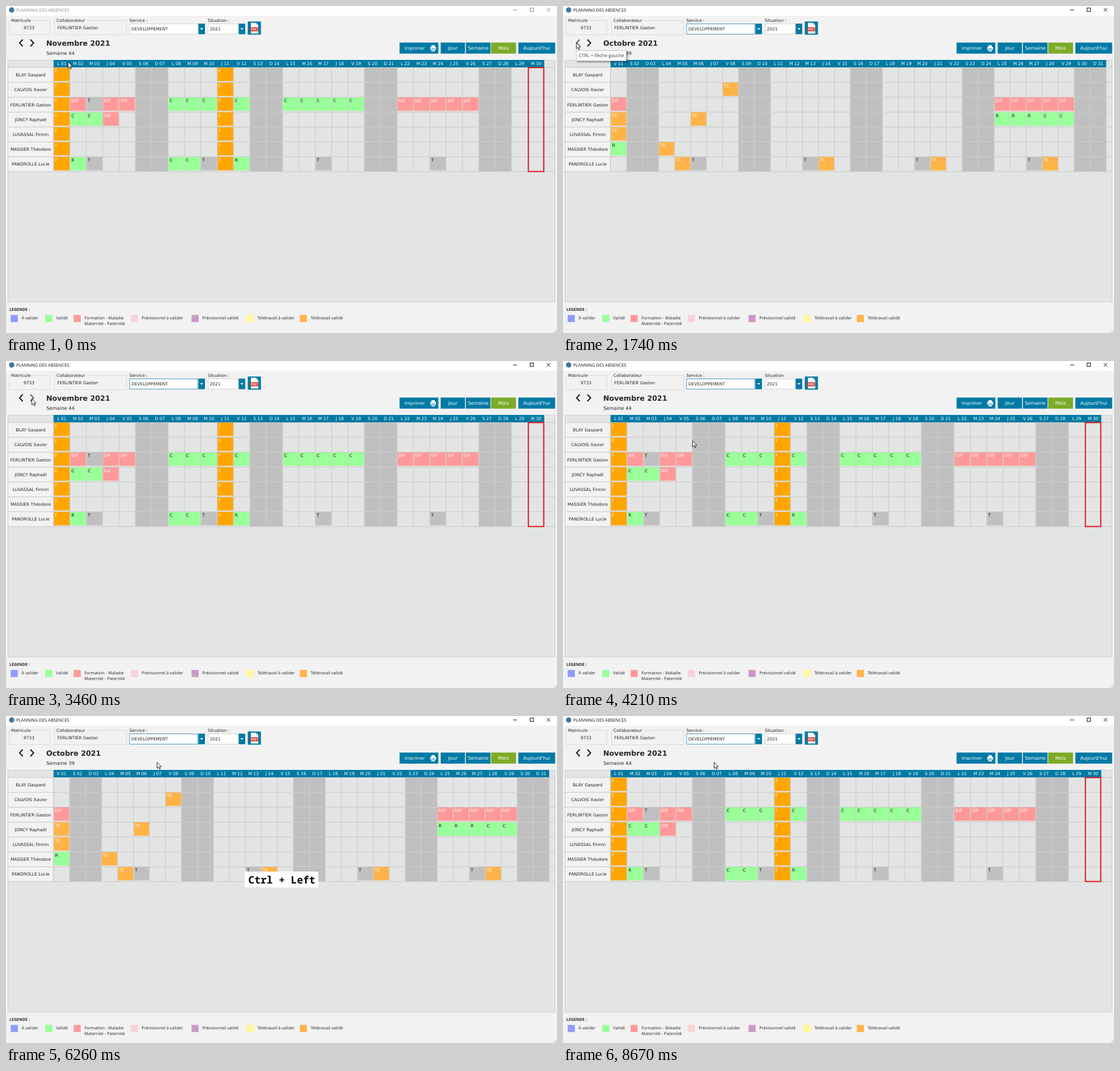
Animation, 972 px wide and 576 px high, one loop 9280 ms. Source, as an HTML page with a canvas:

```html
<!DOCTYPE html>
<html lang="fr">
<head>
<meta charset="utf-8">
<title>Planning des absences</title>
<style>
html, body { margin: 0; width: 100%; height: 100%; overflow: hidden; background: #f2f2f2; }
canvas { display: block; }
</style>
</head>
<body>
<canvas id="stage" width="972" height="576"></canvas>
<script>
const ctx = document.getElementById('stage').getContext('2d');
const LOOP = 9280;
const SANS = '"DejaVu Sans", sans-serif', UI = '"Open Sans", sans-serif', MONO = '"Noto Sans Mono", monospace';
const BLUE = '#007aa5', GREEN = '#7cab27', INK = '#262626', PANEL = '#e3e5e4', LINE = '#cccccc';
const LEFT = 84, TOP = 108, ROW = 26.22, BOTTOM = TOP + 7 * ROW;

const people = ['BLAY Gaspard', 'CALVOIS Xavier', 'FERLINTIER Gaston', 'JONCY Raphaël',
  'LUVASSAL Firmin', 'MASSIER Théodore', 'PANDROLLE Lucie'];

// Cell kinds: label, fill, text colour
const kinds = {
  F: ['F', '#ffa500', '#fff3d6'],
  D: ['DIF', '#ff9999', '#fff'],
  E: ['TE', '#ffb347', '#fff'],
  C: ['C', '#99ff99', '#111'],
  R: ['R', '#99ff99', '#111'],
  T: ['T', '#c0c0c0', '#111']
};

const november = {
  title: 'Novembre 2021', week: 'Semaine 44', days: 30, first: 1, width: 28.85, today: 30,
  rows: ['F1 F11', 'F1 F11',
    'F1 D2 T3 D4 D5 C8 C9 C10 F11 C12 C15 C16 C17 C18 C19 D22 D23 D24 D25 D26',
    'F1 C2 C3 D4 F11', 'F1 F11', 'F1 F11', 'F1 R2 T3 C8 C9 T10 F11 R12 T17 T24']
};
const october = {
  title: 'Octobre 2021', week: 'Semaine 39', days: 31, first: 5, width: 28.2,
  rows: ['', 'E8', 'D1 D25 D26 D27 D28 D29', 'E1 E6 R25 R26 R27 C28 C29', 'E1', 'R1 E4',
    'E5 T6 T13 E14 T20 E21 T27 E28']
};

const legend = [
  [8, '#8f9bfa', 'À valider'], [69, '#99ff99', 'Validé'],
  [119, '#ff9999', 'Formation - Maladie', 'Maternité - Paternité'],
  [220, '#f8d2d6', 'Prévisionnel à valider'], [327, '#cc99c6', 'Prévisionnel validé'],
  [424, '#fff799', 'Télétravail à valider'], [518, '#ffb347', 'Télétravail validé']
];

// Pointer moves: start, end, from, to, eased
const moves = [
  [30, 540, 109, 98, 23, 64, 1],
  [2210, 2490, 23, 64, 45, 66, 1],
  [3490, 4180, 45, 66, 226, 139, 1],
  [4209, 4210, 226, 139, 228, 140, 0],
  [4489, 4490, 228, 140, 229, 140, 0],
  [4740, 4940, 229, 140, 189, 107, 0],
  [4940, 5110, 189, 107, 227, 96, 0],
  [5110, 5200, 227, 96, 254, 85, 0],
  [5200, 5360, 254, 85, 266, 81, 0]
];

const within = (t, a, b) => t >= a && t < b;

function box(x, y, w, h, fill, stroke) {
  if (fill) { ctx.fillStyle = fill; ctx.fillRect(x, y, w, h); }
  if (stroke) {
    ctx.strokeStyle = stroke;
    ctx.lineWidth = 1;
    ctx.strokeRect(x + .5, y + .5, w - 1, h - 1);
  }
}

// y is the middle of the capitals
function text(s, x, y, size = 7.5, color = INK, align = 'left', family = SANS, weight = 400) {
  ctx.font = `${weight} ${size}px ${family}`;
  ctx.fillStyle = color;
  ctx.textAlign = align;
  ctx.fillText(s, x, y + size * .36);
}

function path(points, { fill, stroke, width = 1, close = false }) {
  ctx.beginPath();
  points.forEach(([x, y]) => ctx.lineTo(x, y));
  if (close) ctx.closePath();
  if (fill) { ctx.fillStyle = fill; ctx.fill(); }
  if (stroke) { ctx.strokeStyle = stroke; ctx.lineWidth = width; ctx.stroke(); }
}

function pointerAt(t) {
  let pos = [moves[0][2], moves[0][3]];
  for (const [a, b, x0, y0, x1, y1, eased] of moves) {
    if (t < a) break;
    let k = Math.min(1, (t - a) / (b - a));
    if (eased) k = k * k * (3 - 2 * k);
    pos = [Math.round(x0 + (x1 - x0) * k), Math.round(y0 + (y1 - y0) * k)];
  }
  return pos;
}

function titleBar(active) {
  const ink = active ? '#111' : '#8c8c8c';
  box(0, 0, 972, 17, '#fff');
  ctx.beginPath();
  ctx.arc(10, 7, 4.7, 0, 7);
  ctx.fillStyle = '#3b78a8';
  ctx.fill();
  text('PLANNING DES ABSENCES', 18, 7, 7.65, ink, 'left', UI);
  box(894.5, 6.5, 7, 1, ink);
  box(924, 3, 7, 7, null, ink);
  path([[954, 3.7], [960, 9.7]], { stroke: ink });
  path([[960, 3.7], [954, 9.7]], { stroke: ink });
}

function group(x, w, label, labelWidth) {
  box(x, 25, w, 26, null, '#d9d9d9');
  box(x + 3, 24, labelWidth, 3, '#f2f2f2');
  text(label, x + 4, 25.5, 7.45);
}

function combo(x, w, label, value, focused) {
  text(label, x, 25.5, 7.45);
  box(x, 31, w, 19, '#fff', focused ? '#4a93c4' : '#d4d4d4');
  text(value, x + 3.5, 40.7, 7.45);
  box(x + w + .5, 31, 11.5, 18.7, BLUE);
  const c = x + w + 6.2;
  path([[c - 2.7, 39], [c + 2.7, 39], [c, 42]], { fill: '#fff' });
}

function pdfButton() {
  box(426.5, 27.3, 23.2, 23.2, BLUE);
  path([[432, 29.5], [441, 29.5], [445, 33.5], [445, 48.5], [432, 48.5]], { fill: '#f6f6f6', close: true });
  path([[441, 29.5], [441, 33.5], [445, 33.5]], { fill: '#c9d3d8' });
  box(430.5, 37.5, 14, 7, '#d9382f');
  text('PDF', 437.5, 41, 5.5, '#fff', 'center', UI, 700);
}

function button(x, w, label, fill = BLUE, size = 8.35, cx = x + w / 2) {
  box(x + .3, 64.4, w - .6, 19.5, fill);
  text(label, cx, 74.2, size, '#fff', 'center');
}

function printer() {
  box(750.5, 69, 6, 3, '#fff');
  box(748.5, 72, 10, 5, '#fff');
  box(750, 75, 7, 1, BLUE);
  box(750.5, 76, 6, 4, '#fff');
  box(751.5, 77.5, 4, 1, BLUE);
}

function toolbar(active) {
  group(5, 73, 'Matricule', 35);
  text('9733', 40.5, 38.2, 7.5, INK, 'center');
  group(85, 128, 'Collaborateur', 54);
  text(people[2], 90.5, 38.2);
  combo(217.5, 121.5, 'Service :', 'DEVELOPPEMENT', active);
  combo(356, 54, 'Situation :', '2021', false);
  pdfButton();
  button(694, 69, 'Imprimer', BLUE, 7.8, 721);
  printer();
  button(766.5, 43.5, 'Jour');
  button(811, 44, 'Semaine');
  button(855.5, 44.5, 'Mois', GREEN);
  button(903.5, 65.5, "Aujourd'hui");
}

function chevrons([x, y]) {
  const over = y < 76 && x > 15 && x < 56;
  const color = on => on ? '#676c5d' : '#1e1e1e';
  path([[29.5, 59], [24, 65], [29.5, 71]], { stroke: color(over && x < 36), width: 2.1 });
  path([[43, 59], [48.7, 65], [43, 71]], { stroke: color(over && x >= 36), width: 2.1 });
}

function grid(month) {
  const { days, first, width } = month;
  const colX = d => LEFT + (d - 1) * width;
  box(3, 95, 966, 427, PANEL, '#cfcfcf');
  box(4, TOP, 80, BOTTOM - TOP, '#f2f2f2');

  for (let d = 1; d <= days; d++) {
    if ((first + d - 1) % 7 % 6 === 0) box(colX(d), TOP, width, BOTTOM - TOP, '#c0c0c0');
  }
  for (let d = 1; d <= days + 1; d++) box(colX(d) - .6, TOP, 1.2, BOTTOM - TOP, LINE);
  for (let r = 0; r <= 7; r++) box(3, TOP + r * ROW - .4, 966, 1.2, LINE);
  box(83, 95, 1, BOTTOM - 95, LINE);

  box(LEFT, 95, days * width, 13, BLUE);
  for (let d = 1; d <= days; d++) {
    const label = 'DLMMJVS'[(first + d - 1) % 7] + ' ' + String(d).padStart(2, '0');
    text(label, colX(d) + width / 2, 101.7, 7.5, '#fff', 'center');
  }

  month.rows.forEach((row, r) => {
    const y = TOP + r * ROW;
    text(people[r], 43.5, y + 13.4, 7.5, INK, 'center');
    for (const code of row.split(' ').filter(Boolean)) {
      const [label, fill, ink] = kinds[code[0]];
      const x = colX(+code.slice(1));
      box(x + .7, y + .6, width - 1.4, 23.6, fill);
      text(label, x + 2.5, y + 6.2, 7.5, ink);
    }
  });

  if (month.today) {
    ctx.strokeStyle = '#e3171b';
    ctx.lineWidth = 2;
    ctx.strokeRect(colX(month.today) + .9, TOP + .5, width - 1.8, BOTTOM - TOP - .5);
  }
}

function footer() {
  text('LEGENDE :', 6, 534, 7.1, INK, 'left', UI, 700);
  for (const [x, color, ...lines] of legend) {
    box(x + .3, 544.2, 12.5, 12.5, color);
    lines.forEach((s, i) => text(s, x + 19.3, 549 + i * 10, 7.4, INK, 'left', UI));
  }
  for (let i = 1; i < 4; i++) path([[972 - i * 2, 576], [972, 576 - i * 2]], { stroke: '#b0b0b0', width: .7 });
}

function tooltip(x, y, w, label) {
  ctx.save();
  ctx.shadowColor = 'rgba(0,0,0,.4)';
  ctx.shadowBlur = 3;
  ctx.shadowOffsetX = ctx.shadowOffsetY = 2;
  box(x, y, w, 19, '#fbfbfb');
  ctx.restore();
  box(x, y, w, 19, null, '#c4c4c4');
  text(label, x + 4.8, y + 9.5, 8.1, '#444', 'left', UI);
}

function keys(label) {
  const w = label.length * 10.75 + 12;
  box(Math.round(486.25 - w / 2), 274, Math.round(w), 28, '#fff');
  text(label, 486.5, 288.3, 17.9, '#000', 'center', MONO, 700);
}

function pointer([x, y]) {
  const shape = [[0, 0], [0, 16], [3.7, 12.6], [6.3, 18.5], [8.8, 17.4], [6.3, 11.6], [11.3, 11.6]];
  path(shape.map(([a, b]) => [x + .5 + a * .67, y + .5 + b * .67]),
    { fill: '#fff', stroke: '#111', width: .9, close: true });
}

function draw(now) {
  const t = now % LOOP;
  const active = t >= 1510;
  const pos = pointerAt(t);
  const heading = within(t, 1660, 3430) || within(t, 6200, 8120) ? october : november;
  const shown = within(t, 1690, 3460) || within(t, 6260, 8150) ? october : november;

  ctx.textRendering = 'geometricPrecision';
  box(0, 0, 972, 576, '#f2f2f2');
  titleBar(active);
  toolbar(active);
  chevrons(pos);
  text(heading.title, 71, 65, 12.65, INK, 'left', SANS, 700);
  text(heading.week, 71.3, 83.2, 8.35);
  grid(shown);
  footer();

  if (within(t, 1740, 2240)) tooltip(23, 78, 89, 'CTRL + flèche gauche');
  if (within(t, 2850, 3260)) tooltip(45, 79, 81, 'CTRL + flèche droite');
  if (within(t, 5690, 6200) || within(t, 7560, 8120)) keys('Ctrl');
  if (within(t, 6200, 6780)) keys('Ctrl + Left');
  if (within(t, 8120, 8670)) keys('Ctrl + Right');
  pointer(pos);
}

const start = performance.now();
function tick() {
  draw(performance.now() - start);
  requestAnimationFrame(tick);
}
tick();
</script>
</body>
</html>
```
